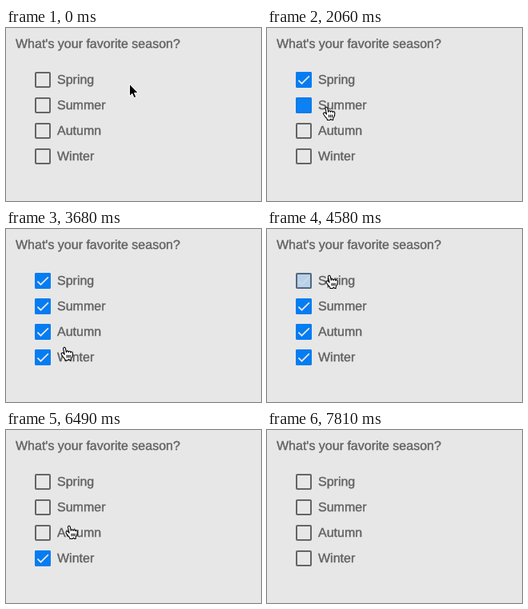
Recreate the animation shown at these times as an HTML page. Size 319 px wide and 217 px high, loop 8.11 s.

```html
<!DOCTYPE html>
<html lang="en">
<head>
<meta charset="utf-8">
<title>Favorite season</title>
<style>
  html, body { margin: 0; width: 100%; height: 100%; overflow: hidden; background: #e7e7e7; }
  svg { display: block; }
  text {
    font: 16px "Liberation Sans", Arial, sans-serif; font-kerning: none; text-rendering: geometricPrecision;
    fill: #626262; stroke: #626262; stroke-width: .4px;
  }
  .frame { fill: none; stroke: #656565; stroke-width: 2; }
  .fill { fill: #047cf2; }
  .tick { fill: none; stroke: #e7e7e7; stroke-width: 1.7; }
  #arrow { stroke: #fff; }
  #hand { fill: #fff; stroke: #000; stroke-width: 1.1; stroke-linejoin: round; }
</style>
</head>
<body>
<svg width="319" height="217">
  <text x="12" y="25">What's your favorite season?</text>
  <g id="list"></g>
  <path id="arrow" d="M0-.8V14.6L3.4 11.4 5.7 16.6 8.3 15.5 6 10.4H10.8Z"/>
  <g id="hand">
    <path d="M3.3 13.4C2.3 11.8.9 10 .6 9.4.2 8.2 1.3 7.3 2.3 7.6 3.3 8 4 9 4.6 9.7L3.1 3C2.5.4 5.2-.1 5.8 2.1L6.8 6.9C6.6 4.6 9.3 4.6 9.5 7 9.6 5 12 5 12.2 7.3 12.6 5.8 14.8 6 14.8 8 14.9 10.8 14.6 12 13.6 13.3 12.2 14.9 12.5 15.6 12.6 17L11.2 17 10 15.7 8.6 17H5.5C5.6 15.3 4.5 14.9 3.3 13.4Z"/>
    <path d="M7.6 10.3v3.4M9.6 10.3v3.4M11.6 10.3v3.4"/>
  </g>
</svg>
<script>
const LOOP = 8110, STEP = 145, REST = 2 * STEP;
const $ = id => document.getElementById(id);
const seasons = ['Spring', 'Summer', 'Autumn', 'Winter'];

// The pointer reaches each stop in a few steps, clicks, rests, then leaves
const stops = [
  { click: 10, x: 154.5, y: 71 },
  { click: 1180, x: 69, y: 62.5, steps: 4 },
  { click: 2060, x: 70, y: 98.5, steps: 2 },
  { click: 2790, x: 70, y: 121, steps: 2 },
  { click: 3380, x: 68, y: 159, steps: 1 },
  { click: 4580, x: 73.5, y: 57.5, steps: 3 },
  { click: 5470, x: 77, y: 96, steps: 2 },
  { click: 6345, x: 74.5, y: 119.5, steps: 3 },
  { click: 7230, x: 75, y: 155, steps: 2 },
  { click: LOOP, x: 600, y: 250, steps: 3 },
];

$('list').innerHTML = seasons.map((name, i) => `
  <g transform="translate(36 ${55 + 32 * i})">
    <rect class="frame" x="1" y="1" width="18" height="18" rx="1"/>
    <rect class="fill" width="20" height="20" rx="2"/>
    <path class="tick" d="M3.4 10.6 7.5 14.7 16.9 5.3"/>
    <text x="28" y="15">${name}</text>
  </g>`).join('');
const fills = document.querySelectorAll('.fill');
const ticks = document.querySelectorAll('.tick');

// Opacity of a box part that changes in two steps on each click
function fade(t, on, off, halfOn, halfOff) {
  if (t < on || t >= off + STEP) return 0;
  if (t >= off) return halfOff;
  return t < on + STEP ? halfOn : 1;
}

function pointer(t) {
  const next = Math.max(1, stops.findLastIndex(s => s.click + REST <= t) + 1);
  const from = stops[next - 1], to = stops[next];
  const step = Math.floor((t - from.click - REST) / STEP) + 1;
  const eased = Math.min(1, Math.max(0, step / to.steps)) ** 2;
  const mix = (a, b) => a + (b - a) * eased;
  return [mix(from.x, to.x), mix(from.y, to.y)];
}

function draw(t) {
  seasons.forEach((_, i) => {
    const on = stops[i + 1].click, off = stops[i + 5].click;
    fills[i].style.opacity = fade(t, on, off, .96, .2);
    ticks[i].style.opacity = fade(t, on, off, 0, .4);
  });
  const [x, y] = pointer(t);
  const overLabel = x < 110;
  for (const [id, shown] of [['hand', overLabel], ['arrow', !overLabel]]) {
    $(id).setAttribute('transform', `translate(${x} ${y})`);
    $(id).setAttribute('visibility', shown ? 'visible' : 'hidden');
  }
}

function tick() {
  draw(performance.now() % LOOP);
  requestAnimationFrame(tick);
}
tick();
</script>
</body>
</html>
```
